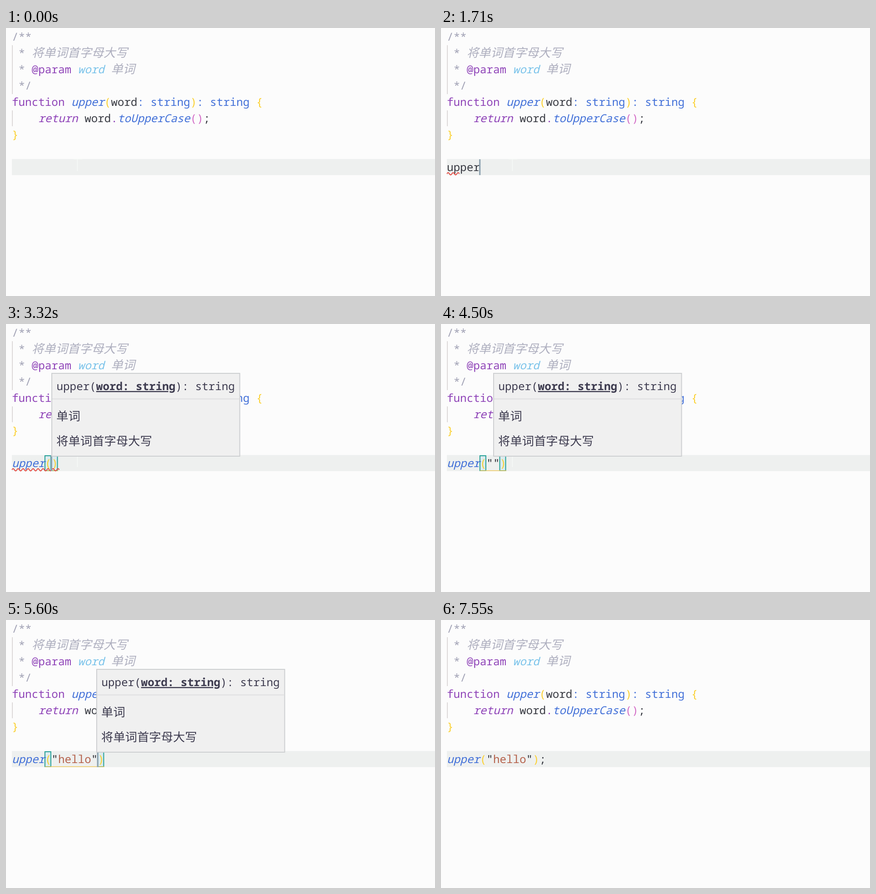
Animation of 946 by 592 pixels, one loop 7720 ms. Source, as an HTML page:

```html
<!DOCTYPE html>
<html lang="zh-CN">
<head>
<meta charset="utf-8">
<title>Typing a call</title>
<style>
  html, body { margin: 0; width: 100%; height: 100%; overflow: hidden; background: #fcfcfc; }
  svg { display: block; width: 946px; height: 592px; }
  text {
    font: 24.28px "Noto Sans Mono", "DejaVu Sans Mono", monospace;
    white-space: pre; text-rendering: geometricPrecision; fill: #383a42;
  }
  .cjk { font-family: "Noto Sans CJK SC", "Noto Sans CJK", sans-serif; font-size: 26.4px; }
  .thin { font-weight: 300; fill-opacity: .85; }
  .i { font-style: italic; }
  .b { font-weight: 700; }
  .u { text-decoration: underline; }
  .comment { fill: #a0a1b4; }
  .key { fill: #8f44b8; }
  .fn { fill: #4270d8; }
  .arg { fill: #7ac3ea; }
  .paren { fill: #fbd030; }
  .inner { fill: #d36cc6; }
  .str { fill: #b5624c; }
  .quote { fill: #26272e; }
  .ui { fill: #3d3b4f; }
  .dim { fill: #7a7a86; }
  .panel { fill: #f0f0f0; stroke: #cdcfd1; stroke-width: 2; }
  .cube, .var, .snip { fill: none; stroke-width: 1.8; stroke-linejoin: round; }
  .cube { stroke: #65438f; }
  .var { stroke: #2278bd; }
  .snip { stroke: #45434f; }
</style>
</head>
<body>
<svg viewBox="0 0 946 592">
  <rect width="946" height="592" fill="#fcfcfc"/>
  <path d="M14 38V146M14 182V217" stroke="#d5d0d0" stroke-width="1.6"/>
  <g id="code"></g>
  <rect x="13" y="289.5" width="933" height="35.5" fill="#eef0ef"/>
  <g id="live"></g>
</svg>
<script>
const LOOP = 7720, CHAR = 14.57, LEFT = 13;
const colX = c => LEFT + c * CHAR;

const span = ([s, cls = '']) => `<tspan class="${cls}">${s}</tspan>`;
const text = (x, y, parts) => `<text x="${x}" y="${y}">${parts.map(span).join('')}</text>`;
const row = (n, ...parts) => text(LEFT, 28 + n * 36, parts);

document.getElementById('code').innerHTML =
  row(0, ['/**', 'comment']) +
  row(1, [' * ', 'comment'], ['将单词首字母大写', 'comment i cjk thin']) +
  row(2, [' * ', 'comment'], ['@param', 'key'], [' '], ['word', 'arg i'], [' '], ['单词', 'comment i cjk thin']) +
  row(3, [' */', 'comment']) +
  row(4, ['function', 'key'], [' '], ['upper', 'fn i'], ['(', 'paren'], ['word'], [': string', 'fn'],
    [')', 'paren'], [':', 'fn'], [' '], ['string', 'fn'], [' '], ['{', 'paren']) +
  row(5, ['    '], ['return', 'key i'], [' word'], ['.', 'key'], ['toUpperCase', 'fn i'], ['()', 'inner'], [';']) +
  row(6, ['}', 'paren']);

const icons = {
  cube: '<path class="cube" d="M49 333L60 338.5V351.5L49 357.5L38 351.5V338.5ZM38 338.5L49 344.5L60 338.5M49 344.5V357.5"/>',
  var: '<path class="var" d="M41 374H37V389H41M57 374H61V389H57M43 381L51 376L56 379V383L48 388L43 385ZM43 381L48 384L56 379M48 384V388" transform="translate(0 -36)"/>',
  snip: '<path class="snip" d="M38.5 353V333.5H61.5V353"/><path class="snip" stroke-dasharray="2 2" d="M38 357H62"/>'
};
const react = ' (ES7 React/Redux)';
const hook = name => ['snip', name, name + react];
const menus = {
  u: [['cube', 'upper', 'function upper(word: string)'], ['var', 'undefined'], ['cube', 'unescape'],
    ...['useCallback', 'useContext', 'useDebugValue', 'useEffect', 'useImperativeHandle'].map(hook)],
  up: [['cube', 'upper', 'function upper(word: string)'], ['cube', 'unescape'], hook('useImperativeHandle'),
    ...['Uint8ClampedArray', 'URLPattern', 'URLSearchParams', 'CSSUnparsedValue', 'SVGUnitTypes'].map(s => ['var', s])]
};

// Bold the letters of the query, in order.
function label(name, query) {
  let k = 0;
  return [...name].map(ch => {
    const hit = k < query.length && ch.toLowerCase() === query[k];
    if (hit) k++;
    return [ch, hit ? 'ui b' : 'ui'];
  });
}

function menu(query) {
  const items = menus[query].map(([icon, name, info = ''], n) =>
    `<g transform="translate(0 ${n * 36})">${icons[icon]}` +
    text(71.5, 354, label(name, query)) +
    text(488, 354, [[info.length > 22 ? info.slice(0, 21) + '…' : info, 'dim']]) + '</g>');
  return `<g transform="translate(${(query.length - 1) * CHAR} 0)">
    <rect class="panel" x="29.5" y="326" width="811.5" height="300"/>
    <rect x="30.5" y="327" width="809.5" height="36" fill="#d4e7f6"/>${items.join('')}</g>`;
}

function hint(col) {
  return `<g transform="translate(${Math.round(colX(col) - 100)} 0)">
    <rect class="panel" x="101" y="109" width="414.5" height="183"/>
    <path d="M102 165.5H514.5" stroke="#dfe0e1" stroke-width="2"/>` +
    text(111.5, 146, [['upper(', 'ui'], ['word: string', 'ui b u'], ['): string', 'ui']]) +
    text(111, 213, [['单词', 'ui cjk']]) +
    text(111, 268, [['将单词首字母大写', 'ui cjk']]) + '</g>';
}

function squiggle(cols) {
  const halves = Math.round(cols * CHAR / 5.5);
  return `<path d="M13 322q2.75 -5 5.5 0${'t5.5 0'.repeat(halves - 1)}" fill="none" stroke="#e5453c" stroke-width="1.8"/>`;
}

function match(close) {
  const box = c => `<rect x="${colX(c)}" y="291" width="13" height="33" fill="#dcebee" stroke="#24a097" stroke-width="2"/>`;
  return box(5) + box(close) + `<path d="M${colX(5)} 324H${colX(close + 1)}" stroke="#ecc95c" stroke-width="1.4"/>`;
}

function typed(s) {
  const m = /^upper\(("?)(\w*)("?)\)(;?)$/.exec(s);
  return m ? row(8, ['upper', 'fn i'], ['(', 'paren'], [m[1], 'quote'], [m[2], 'str'], [m[3], 'quote'], [')', 'paren'], [m[4]])
    : row(8, [s]);
}

// Each step changes part of the state: s text, c caret column, on caret shown.
const steps = [
  [0, { s: '', c: 0, on: 0, menu: '', hint: 0, wave: 0, match: 0, mouse: 1 }],
  [530, { on: 1 }],
  [760, { s: 'u', c: 1 }],
  [840, { menu: 'u' }],
  [1160, { s: 'up', c: 2, menu: 'up' }],
  [1540, { s: 'upper', c: 5, menu: '' }],
  [1625, { wave: 2 }],
  [2090, { on: 0 }],
  [2170, { wave: 0 }],
  [2630, { on: 1 }],
  [2940, { s: 'upper()', c: 6 }],
  [3010, { match: 6 }],
  [3090, { hint: 6 }],
  [3320, { wave: 7 }],
  [3560, { on: 0 }],
  [4030, { s: 'upper("")', c: 7, on: 1, match: 8 }],
  [4120, { hint: 7 }],
  [4500, { on: 0, wave: 0 }],
  [4660, { s: 'upper("h")', c: 8, on: 1, match: 9, mouse: 0 }],
  [4740, { hint: 8 }],
  [4820, { s: 'upper("he")', c: 9, match: 10 }],
  [4900, { hint: 9 }],
  [5050, { s: 'upper("hel")', c: 10, match: 11 }],
  [5130, { hint: 10 }],
  [5210, { s: 'upper("hell")', c: 11, match: 12 }],
  [5290, { s: 'upper("hello")', c: 12, match: 13, hint: 11 }],
  [5370, { hint: 12 }],
  [5600, { c: 13, hint: 12.75 }],
  [5680, { hint: 13 }],
  [5760, { c: 14 }],
  [5840, { hint: 14 }],
  [5920, { hint: 0 }],
  [6300, { s: 'upper("hello");', c: 15 }],
  [6385, { match: 0 }],
  [6850, { on: 0 }],
  [7400, { on: 1 }],
  [7550, { on: 0 }]
];
let state = {};
const states = steps.map(([, change]) => state = { ...state, ...change });

function draw(v) {
  const caretX = Math.max(13.5, colX(v.c) - 1.8);
  return (v.mouse ? '<path d="M149 289.5H168M157.5 290V316" stroke="#f7f9f8" stroke-width="1.5"/>' : '') +
    (v.match ? match(v.match) : '') +
    typed(v.s) +
    (v.wave ? squiggle(v.wave) : '') +
    (v.on ? `<rect x="${caretX}" y="290" width="3.2" height="35" fill="#90a4b2"/>` : '') +
    (v.menu ? menu(v.menu) : '') +
    (v.hint ? hint(v.hint) : '');
}

const live = document.getElementById('live');
let shown = -1;
function tick() {
  const t = performance.now() % LOOP;
  const n = steps.findLastIndex(([at]) => at <= t);
  if (n !== shown) live.innerHTML = draw(states[shown = n]);
  requestAnimationFrame(tick);
}
tick();
</script>
</body>
</html>
```
